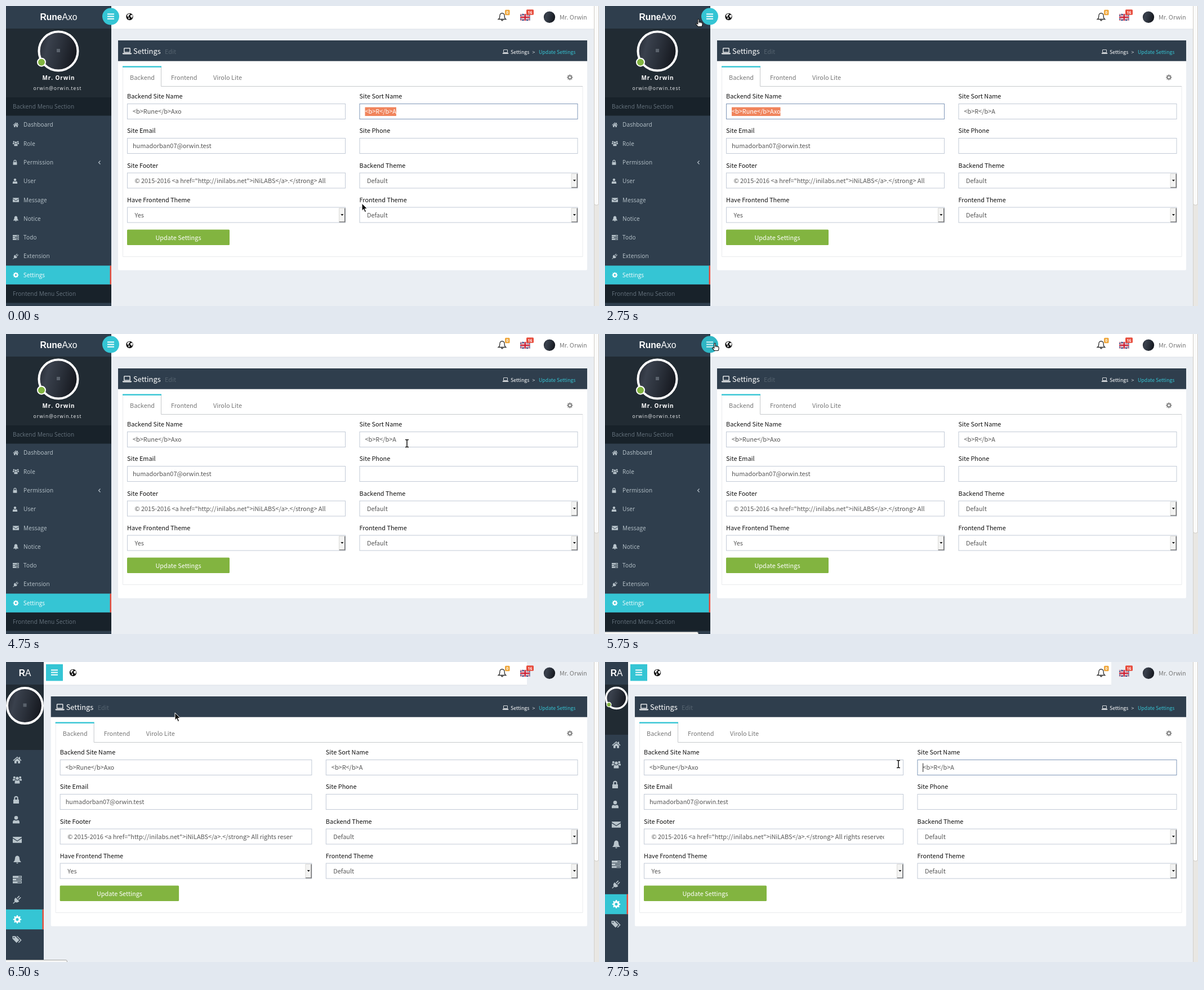
An HTML page for the animation above (8000 ms loop, 1053x532 px).

```html
<!DOCTYPE html>
<html lang="en">
<head>
<meta charset="utf-8">
<title>Settings</title>
<style>
html, body { margin: 0; width: 100%; height: 100%; overflow: hidden; background: #eaeef3; }
svg { display: block; }
.src { font-family: "Noto Sans CJK JP", "Noto Sans CJK SC", "Noto Sans CJK", sans-serif; }
.open { font-family: "Open Sans", "Noto Sans", sans-serif; }
.arial { font-family: "Liberation Sans", Arial, sans-serif; }
</style>
</head>
<body>
<svg id="stage" width="1053" height="532" viewBox="0 0 1053 532"></svg>
<script>
const stage = document.getElementById('stage');
const NAVY = '#2f3e4d', CYAN = '#35c5d4', GREEN = '#82b440', RED = '#e74c3c', LINE = '#c2cad6';
const BODY = 10.9;
const LOOP = 8000, STEP = 250;
const SITE = '<b>Rune</b>Axo', SHORT = '<b>R</b>A';
const FOOTER = '© 2015-2016 <a href="http://inilabs.net">iNiLABS</a>.</strong> All rights reserved.';

// Drawing helpers
const esc = s => s.replace(/&/g, '&amp;').replace(/</g, '&lt;').replace(/>/g, '&gt;');
const rect = (x, y, w, h, fill, extra = '') =>
  `<rect x="${x}" y="${y}" width="${w}" height="${h}" fill="${fill}" ${extra}/>`;
const circle = (x, y, r, fill, extra = '') => `<circle cx="${x}" cy="${y}" r="${r}" fill="${fill}" ${extra}/>`;
const path = (d, fill, extra = '') => `<path d="${d}" fill="${fill}" ${extra}/>`;
const raw = (x, y, inner, size, fill, extra = '', font = 'src') =>
  `<text class="${font}" x="${x}" y="${y}" font-size="${size}" fill="${fill}" ${extra}>${inner}</text>`;
const text = (x, y, s, ...rest) => raw(x, y, esc(s), ...rest);
const MID = 'text-anchor="middle"';

const pen = document.createElement('canvas').getContext('2d');
function textWidth(s) {
  pen.font = BODY + 'px "Noto Sans CJK JP", "Noto Sans CJK SC", "Noto Sans CJK", sans-serif';
  return pen.measureText(s).width;
}

// Icons on a 16 x 16 grid
const disc = (x, y, r) => `M${x - r} ${y}a${r} ${r} 0 1 0 ${2 * r} 0a${r} ${r} 0 1 0 ${-2 * r} 0z`;
function gear() {
  let d = '';
  for (let i = 0; i < 32; i++) {
    const a = (i - 0.5) / 32 * 2 * Math.PI, r = i % 4 < 2 ? 7.4 : 5.5;
    d += (i ? 'L' : 'M') + (8 + r * Math.cos(a)).toFixed(2) + ' ' + (8 + r * Math.sin(a)).toFixed(2);
  }
  return d + 'z' + disc(8, 8, 2.5);
}
const ICONS = {
  home: 'M8 2 .5 8.6l1 1.1L8 4l6.5 5.7 1-1.1L13 6.4V2.8h-2v1.9zM8 5.2 3 9.6V14h3.8v-3.6h2.4V14H13V9.6z',
  users: disc(8, 5.2, 2.7) + disc(2.8, 3.6, 2) + disc(13.2, 3.6, 2) +
    'M3.6 14.4v-2.6q0-3 2.1-3.3 2.3 1.6 4.6 0 2.1.3 2.1 3.3v2.6zM0 9.4V8q0-2 1.3-2 1.6 1 3 .2.3 1.2.8 1.7-1.6.2-2.2 1.5zM16 9.4V8q0-2-1.3-2-1.6 1-3 .2-.3 1.2-.8 1.7 1.6.2 2.2 1.5z',
  lock: 'M3 7.5h10V14.5H3zM4.3 7.5V5a3.7 3.7 0 0 1 7.4 0v2.5h-2V5a1.7 1.7 0 0 0-3.4 0v2.5z',
  user: disc(8, 4.6, 3.3) + 'M2 14.4v-2q0-3.6 2.7-4 3.3 2.2 6.6 0 2.7.4 2.7 4v2z',
  mail: 'M0 2.8h16v1.4L8 9.6 0 4.2zM0 5.8 8 11l8-5.2v7.8H0z',
  bell: 'M8 1.2q4 .6 4 5 0 4 2.6 5.8v.7H1.4V12Q4 10.2 4 6.2q0-4.4 4-5zM6.3 13.3h3.4q0 1.7-1.7 1.7t-1.7-1.7z',
  list: 'M0 1.6h16v3.6H0zM0 6.3h16v3.6H0zM0 11h16v3.6H0zM10 2.8h5v1.2h-5zM6 7.5h9v1.2H6zM8.5 12.2H15v1.2H8.5z',
  plug: 'M5 4.5 11.5 11Q8 14.5 4.3 12.6l-3.1 3-.9-.9 3.1-3Q1.5 8 5 4.5zM7.2 5.2 11 1.4q1 0 1.1 1.1L8.4 6.4zM9.6 7.6l3.9-3.8q1 0 1.1 1.1l-3.8 3.9z',
  gear: gear(),
  tags: 'M0 2.5V7l6.8 6.8 4.6-4.6-6.8-6.7z' + disc(2.6, 5, 1) + 'M6.5 2.5h1.8l6.9 6.9-4.6 4.6-1-1 3.7-3.6z',
  laptop: 'M2.2 3.4q0-1.2 1.2-1.2h9.2q1.2 0 1.2 1.2v7.4H2.2zM3.5 3.5v6h9v-6zM0 11.6h16v1q0 1-1.2 1H1.2q-1.2 0-1.2-1z'
};
const icon = (name, x, y, size, fill) => path(ICONS[name], fill,
  `fill-rule="evenodd" transform="translate(${x - size / 2} ${y - size / 2}) scale(${size / 16})"`);

const MENU = [['home', 'Dashboard'], ['users', 'Role'], ['lock', 'Permission'], ['user', 'User'],
  ['mail', 'Message'], ['bell', 'Notice'], ['list', 'Todo'], ['plug', 'Extension'], ['gear', 'Settings']];

// Cursor for each step: kind, x, y
const POINTER = [
  'a 632 350', 'a 560 290', 'a 420 216', 'i 330 190', 'i 312 190', 'i 274 193', 'i 227 190', 'i 222 190',
  'a 212 160', 'a 190 90', 'h 166 23', 'h 128 24', 'h 122 24', 'a 131 62', 'a 141 70', 'a 136 63',
  'a 300 110', 'a 560 170', 'i 712 194', 'a 400 90', 'h 192 8', 'h 194 14', 'h 195 16', 'h 194 17',
  'h 193 17', 'a 300 90', 'a 430 150', 'i 575 188', 'i 566 187', 'i 545 184', 'i 521 181'
].map(p => p.split(' '));

function sceneAt(s) {
  const v = {
    w: 187, foot: 162, avatar: [93, 80, 36.5], shut: s >= 24, dot: s < 24 || s > 25,
    focus: s < 4 || s >= 28 ? 'short' : s < 12 ? 'site' : '',
    pick: s < 4 ? 0 : s === 5 ? 7 : s > 5 && s < 12 ? 0 : -1,
    caret: s >= 28, ghost: s >= 13 && s <= 15,
    status: s >= 11 && s <= 15 ? 148 : s >= 20 && s <= 24 ? 166 : s === 25 ? 109 : 0,
    hover: s >= 20 && s <= 24
  };
  if (s === 25) Object.assign(v, { w: 67, foot: 156, avatar: [33.5, 77.5, 33.5] });
  if (s > 25) Object.assign(v, { w: 41, foot: 129, avatar: [20.3, 64, 20.3] });
  return v;
}

const brand = (x, shut) => raw(x, 25,
  shut ? '<tspan font-weight="700">R</tspan>A' : '<tspan font-weight="700">Rune</tspan>Axo',
  15.6, '#fff', MID, 'arial');

function photo(x, y, r) {
  return circle(x, y, r, 'url(#photo)');
}

function sidebar(v) {
  const { w, foot } = v, [ax, ay, ar] = v.avatar, ring = ar > 30 ? 4 : 3.5;
  let out = rect(0, 0, w, 532, NAVY) + brand(w / 2, v.shut) + rect(0, 40, w, foot - 40, '#212b33');
  out += photo(ax, ay, ar - 1) + circle(ax, ay, ar - ring / 2, 'none', `stroke="#fff" stroke-width="${ring}"`);
  if (ar > 30) out += rect(ax - 3, ay - 4, 6, 6, '#5a626c');
  if (v.dot) out += v.shut
    ? circle(7, 75.5, 4, GREEN, 'stroke="#fff" stroke-width="1.3"')
    : circle(63, 99.7, 7, GREEN, 'stroke="#fff" stroke-width="2"');

  const pitch = v.shut ? 35.35 : 33.3, top = v.shut ? foot : 194;
  if (!v.shut) {
    out += text(93.5, 131, 'Mr. Orwin', 10, '#fff', MID + ' font-weight="700" letter-spacing=".9"', 'open') +
      text(91.5, 149, 'orwin@orwin.test', 8.5, '#f0f2f4', MID + ' letter-spacing="1"', 'open');
    [[162, 'Backend'], [494, 'Frontend']].forEach(([y, s]) => {
      out += rect(0, y, w, 32.5, '#18222a') +
        text(12, y + 19.7, s + ' Menu Section', 10.1, '#66737e', 'letter-spacing=".12"', 'open');
    });
    out += path('M167.5 274.5l-3 3 3 3', 'none', 'stroke="#b8c3cc" stroke-width="1.1"');
  }
  MENU.forEach(([name, label], i) => {
    const y = top + pitch * (i + 0.5), on = i === 8, fill = on ? '#fff' : '#b9c5cc';
    if (on) out += rect(0, y - pitch / 2, w, pitch, CYAN) + rect(w - 2.5, y - pitch / 2, 2.5, pitch, RED);
    out += v.shut ? icon(name, name === 'lock' || name === 'user' ? 18 : 20, y, 16, fill)
      : icon(name, name === 'lock' || name === 'user' ? 16 : 17.5, y, 11, fill) +
        text(31, y + 3.7, label, 10, fill, 'letter-spacing=".14"', 'open');
  });
  if (v.shut) out += icon('tags', 20, top + pitch * 9.5, 17, '#b9c5cc');
  return out;
}

function flag(x, y, w, h) {
  const X = `M${x} ${y}l${w} ${h}M${x} ${y + h}l${w} ${-h}`;
  const plus = `M${x + w / 2} ${y}v${h}M${x} ${y + h / 2}h${w}`;
  const s = (d, c, n) => path(d, 'none', `stroke="${c}" stroke-width="${n}"`);
  return rect(x, y, w, h, '#1d2f72') + `<g clip-path="url(#flag)">` + s(X, '#e8e8ee', 2.6) + s(X, '#c8283a', 0.9) +
    s(plus, '#f2f2f4', 4.4) + s(plus, '#cc2036', 2.5) + '</g>';
}

function badge(x, y, w, s, fill) {
  return rect(x, y, w, 9.5, fill, 'rx="1.5"') +
    text(x + w / 2, y + 7.2, s, 6.8, '#fff', MID + ' font-weight="700"', 'open');
}

function topbar(v) {
  const { w } = v, gx = v.shut ? w + 52 : 219.5;
  return rect(w, 0, 858, 41, '#fff') + rect(w, 40.5, 858, 1, '#dde2e7') +
    circle(gx, 19, 6.2, '#161616') +
    path(`M${gx - 3.8} 15.2l3-1.8 1.6 1-1 1.6-1.6.5.6 1.6-1.5 1.2-1.7-1.4zM${gx + 2} 16.2l2.8-.6.8 2.4-1.6 3.2-1.8-1.8-1.2-1.6zM${gx - 2.2} 20l2.4.8-.6 2-1.2 1.2z`, '#fff') +
    path('M881 12.7q4.2.5 4.2 5.2 0 4 2.4 5.6h-13.2q2.4-1.6 2.4-5.6 0-4.7 4.2-5.2zM879.4 24q.2 2 1.6 2t1.6-2', 'none', 'stroke="#333" stroke-width="1.3"') +
    badge(886, 6.7, 8.5, '0', '#efa63a') + flag(913, 14, 17.5, 12) + badge(924, 6.3, 13, '16', RED) +
    photo(965, 19.7, 10.2) + text(983, 24, 'Mr. Orwin', BODY, '#777', 'font-weight="300"');
}

function toggle(v) {
  const x = v.shut ? v.w + 19 : 186;
  const back = v.hover ? '#30b6c4' : CYAN, bars = v.hover ? '#d9f3f6' : '#fff';
  return (v.shut ? rect(x - 15, 4, 30, 29.5, back) : circle(x, 18.6, 15, back)) +
    [13.4, 17.6, 21.8].map(y => rect(x - 6, y, 12, 1.9, bars)).join('');
}

function field(x, y, w, label, value, opt = {}) {
  const tx = x + (opt.inset || 10), ty = y + 18;
  let out = text(x, y - 9, label, BODY, '#111') +
    rect(x + 0.5, y + 0.5, w - 1, 27, '#fff', `stroke="${opt.focus ? '#7f97b8' : LINE}"`);
  if (opt.pick >= 0) {
    const head = value.slice(0, opt.pick), tail = value.slice(opt.pick), dx = textWidth(head);
    return out + rect(tx + dx, y + 6.5, textWidth(tail), 15.5, '#f0845c') +
      raw(tx, ty, `${esc(head)}<tspan fill="#fff">${esc(tail)}</tspan>`, BODY, '#555');
  }
  const id = 'c' + Math.round(x + y);
  out += `<clipPath id="${id}">${rect(x, y, w - 34.5, 28, '#000')}</clipPath><g clip-path="url(#${id})">` +
    text(tx, ty, value, BODY, '#555') + '</g>';
  if (opt.caret) out += rect(tx - 0.3, y + 6.5, 1, 15.5, '#222');
  if (opt.list) {
    const r = x + w;
    out += rect(r - 11.5, y + 2, 10.5, 24.5, '#f3f3f2') +
      path(`M${r - 1.2} ${y + 2}v24.4h-10.3`, 'none', 'stroke="#666" stroke-width="1.4"') +
      path(`M${r - 11.5} ${y + 26}v-24h10`, 'none', 'stroke="#dcdcda"') +
      path(`M${r - 8.6} ${y + 12.4}h5l-2.5 3z`, '#111');
  }
  return out;
}

function panel(v) {
  const L = v.w + (v.w === 67 ? 12.7 : 12), a = L + 16, cw = (1015.5 - a - 24.5) / 2, b = a + cw + 24.5;
  const bw = cw * 0.493 - 9.3, tab = 'font-weight="300"';
  return rect(L, 61, 1032 - L, 407.5, '#fff', 'rx="2"') + rect(L, 61, 1032 - L, 36.7, NAVY) +
    icon('laptop', L + 16, 80, 16, '#fff') + text(L + 27, 85.2, 'Settings', 12.85, '#fff') +
    text(L + 83, 85, 'Edit', BODY, '#55636f', tab) +
    icon('laptop', 887, 81, 10.5, '#fff') + text(896, 84.7, 'Settings', 8.8, '#fff') +
    text(934.5, 84.5, '>', 8.8, '#cfd5da') + text(946, 84.7, 'Update Settings', 8.8, CYAN) +
    path(`M${L + 8.5} 108V444.5H1024V143`, 'none', 'stroke="#e9ebed"') +
    path(`M${L + 76.5} 108V142.5H1024`, 'none', 'stroke="#c6c9cc"') + rect(L + 8, 106.5, 69, 2.4, CYAN) +
    text(L + 21, 130.7, 'Backend', BODY, '#777', tab) + text(L + 94, 130.7, 'Frontend', BODY, '#777', tab) +
    text(L + 169, 130.7, 'Virolo Lite', BODY, '#777', tab) + icon('gear', 1001.3, 126.5, 11.5, '#8b8b8b') +
    field(a, 173, cw, 'Backend Site Name', SITE, { focus: v.focus === 'site', pick: v.focus === 'site' ? v.pick : -1 }) +
    field(b, 173, cw, 'Site Sort Name', SHORT, { focus: v.focus === 'short', pick: v.focus === 'short' ? v.pick : -1, caret: v.caret }) +
    field(a, 234, cw, 'Site Email', 'humadorban07@orwin.test') + field(b, 234, cw, 'Site Phone', '') +
    field(a, 295.5, cw, 'Site Footer', FOOTER, { inset: 13.5 }) +
    field(b, 295.5, cw, 'Backend Theme', 'Default', { inset: 13.5, list: true }) +
    field(a, 356.5, cw, 'Have Frontend Theme', 'Yes', { inset: 13.5, list: true }) +
    field(b, 356.5, cw, 'Frontend Theme', 'Default', { inset: 13.5, list: true }) +
    rect(a, 396.5, bw, 27.5, GREEN, 'rx="1.5"') +
    text(a + bw / 2, 414.7, 'Update Settings', BODY, '#fff', MID);
}

function cursor([kind, x, y]) {
  const shapes = {
    a: path('M0 0V13.2L3.1 10.4 5.2 15.6 7.6 14.6 5.4 9.6H9.6z', '#111', 'stroke="#fff" stroke-width="1"'),
    i: path('M-3-6.5h2q1 0 1 1v11q0 1-1 1h-2M3-6.5H1q-1 0-1 1v11q0 1 1 1h2', 'none', 'stroke="#fff" stroke-width="3.4"') +
      path('M-3-6.5h2q1 0 1 1v11q0 1-1 1h-2M3-6.5H1q-1 0-1 1v11q0 1 1 1h2', 'none', 'stroke="#111" stroke-width="1.5"'),
    h: path('M-1.2 9V1.2Q-1.2.2-.1.2T1 1.2V5l4 .8q2 .5 2 2v3L6 13.5H-.8L-4.4 9.2q0-1.6 1.4-1.2z', '#fff', 'stroke="#111" stroke-width="1.1"') +
      path('M1 5v2.4M3.1 5.5v2M5.1 6v1.8', 'none', 'stroke="#111" stroke-width=".8"')
  };
  return `<g transform="translate(${x} ${y})">${shapes[kind]}</g>`;
}

const DEFS = `<defs>
  <linearGradient id="photo" x1="0" x2="1" y2=".25">
    <stop offset="0" stop-color="#23272f"/><stop offset=".3" stop-color="#3a414d"/>
    <stop offset=".62" stop-color="#2b313b"/><stop offset="1" stop-color="#171a21"/>
  </linearGradient>
  <clipPath id="flag">${rect(913, 14, 17.5, 12, '#000')}</clipPath></defs>`;

function draw(s) {
  const v = sceneAt(s), p = POINTER[s];
  let out = DEFS + rect(0, 0, 1053, 532, '#eaeef3') + topbar(v) + panel(v) + sidebar(v) + toggle(v) +
    rect(1044, 0, 9, 532, '#e9e7e3') + rect(1044, 0, 1, 532, '#d2d0cb') +
    rect(1044.5, -6, 8, 359, '#fbfbfa', 'rx="3" stroke="#cfccc7"');
  if (v.ghost) out += `<g opacity=".55" transform="translate(${p[1] - 126} ${p[2] - 44.5})">` +
    rect(0, 0, 187, 40, NAVY) + brand(93.5, false) + '</g>';
  if (v.status) out += rect(-3, 528.5, v.status + 2.5, 8, '#f6f6f5', 'rx="2.5" stroke="#a9a9a6"');
  stage.innerHTML = out + cursor(p);
}

let shown = -1;
const start = performance.now();
function tick() {
  const t = (performance.now() - start) % LOOP;
  const s = Math.max(0, Math.floor((t - STEP) / STEP));
  if (s !== shown) draw(shown = s);
  requestAnimationFrame(tick);
}
tick();
</script>
</body>
</html>
```
